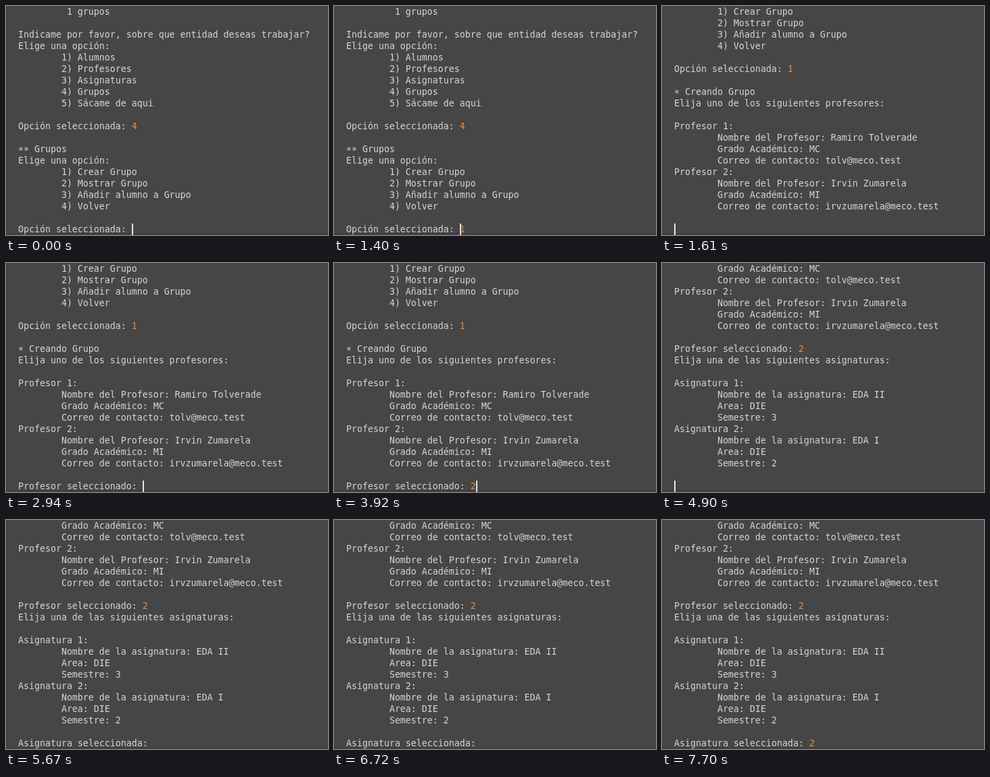
Recreate the animation shown at these times as an HTML page. Size 476 by 340 pixels, loop 8000 ms.

```html
<!DOCTYPE html>
<html lang="es">
<head>
<meta charset="utf-8">
<title>Consola</title>
<style>
  html, body { margin: 0; width: 100%; height: 100%; overflow: hidden; background: #464646; }
  #stage {
    position: relative; width: 476px; height: 340px; overflow: hidden;
    background: linear-gradient(#464646 337px, #433f41 337px);
  }
  #text {
    position: absolute; left: 18px; top: 0; margin: 0;
    font: 13.288px/17px "DejaVu Sans Mono", monospace;
    font-variant-ligatures: none;
    color: #d6d6d6; white-space: pre;
  }
  #text b { font-weight: normal; color: #e0914a; }
  #text i { font-style: normal; position: relative; top: 2px; }
  #caret { position: absolute; top: 323px; width: 2px; height: 17px; background: #e4e4e4; }
</style>
</head>
<body>
<div id="stage"><pre id="text"></pre><div id="caret"></div></div>
<script>
const LOOP = 8000, ROWS = 20, CELL = 8, LEFT = 18;

const item = s => " ".repeat(8) + s;
const menu = (...names) => names.map((name, i) => item(`${i + 1}) ${name}`));
const teacher = (n, name, grade, mail) => [
  `Profesor ${n}:`,
  item("Nombre del Profesor: " + name),
  item("Grado Académico: " + grade),
  item("Correo de contacto: " + mail)
];
const subject = (n, name, term) => [
  `Asignatura ${n}:`,
  item("Nombre de la asignatura: " + name),
  item("Area: DIE"),
  item("Semestre: " + term)
];

// Text in braces is user input.
const log = [
  item(" 1 grupos"),
  "",
  "Indicame por favor, sobre que entidad deseas trabajar?",
  "Elige una opción:",
  ...menu("Alumnos", "Profesores", "Asignaturas", "Grupos", "Sácame de aqui"),
  "",
  "Opción seleccionada: {4}",
  "",
  "** Grupos",
  "Elige una opción:",
  ...menu("Crear Grupo", "Mostrar Grupo", "Añadir alumno a Grupo", "Volver"),
  "",
  "Opción seleccionada: {1}",
  "",
  "* Creando Grupo",
  "Elija uno de los siguientes profesores:",
  "",
  ...teacher(1, "Ramiro Tolverade", "MC", "tolv@meco.test"),
  ...teacher(2, "Irvin Zumarela", "MI", "irvzumarela@meco.test"),
  "",
  "Profesor seleccionado: {2}",
  "Elija una de las siguientes asignaturas:",
  "",
  ...subject(1, "EDA II", 3),
  ...subject(2, "EDA I", 2),
  "",
  "Asignatura seleccionada: {2}"
];

// [start ms, first line, last row: 0 empty / 1 prompt / 2 answered, caret column or -1]
const steps = [
  [0, 0, 1, 21], [560, 0, 1, -1], [1050, 0, 2, 22], [1400, 0, 2, 21],
  [1610, 14, 0, 0], [1890, 14, 1, 23], [2380, 14, 1, -1], [2940, 14, 1, 23],
  [3430, 14, 1, -1], [3920, 14, 2, 24], [4410, 14, 2, -1], [4690, 14, 2, 23],
  [4900, 26, 0, 0], [5180, 26, 1, 25], [5670, 26, 1, -1], [6230, 26, 1, 25],
  [6720, 26, 1, -1], [7210, 26, 2, 26], [7700, 26, 2, -1]
];

const text = document.getElementById("text");
const caret = document.getElementById("caret");
const markup = s => s.replace(/\*/g, "<i>*</i>").replace(/\{(.*?)\}/g, "<b>$1</b>");

function show([, top, stage, col]) {
  const lines = log.slice(top, top + ROWS);
  if (stage === 0) lines[ROWS - 1] = "";
  if (stage === 1) lines[ROWS - 1] = lines[ROWS - 1].replace(/\{.*\}/, "");
  text.innerHTML = markup(lines.join("\n"));
  caret.style.visibility = col < 0 ? "hidden" : "visible";
  caret.style.left = LEFT + CELL * col + "px";
}

let current = null;
function tick() {
  const t = performance.now() % LOOP;
  const step = steps.filter(s => s[0] <= t).pop();
  if (step !== current) show(current = step);
  requestAnimationFrame(tick);
}
tick();
</script>
</body>
</html>
```
